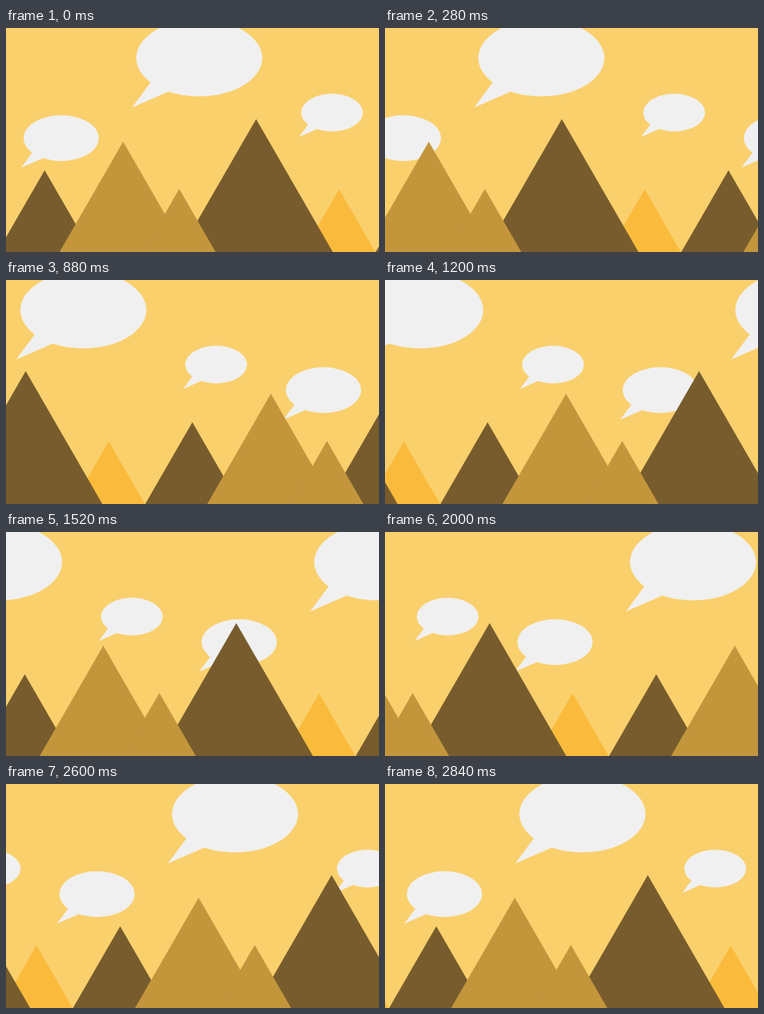
Write an HTML page with a canvas that moves like this. It is 500 by 300 pixels and loops after 2920 ms.

```html
<!DOCTYPE html>
<html lang="en">
<head>
<meta charset="utf-8">
<title>Mountains and speech clouds</title>
<style>
  html, body { margin: 0; width: 100%; height: 100%; overflow: hidden; background: #fad06c; }
  canvas { display: block; }
</style>
</head>
<body>
<canvas id="stage" width="500" height="300"></canvas>
<script>
const ctx = document.getElementById('stage').getContext('2d');
const W = 500, H = 300;
const LOOP = 2920, STEP = 40, LAST = 71;
const PERIOD = 506.9;
const HILL_SPEED = 14.04, CLOUD_SPEED = 7.06; // pixels per step
const SLOPE = Math.tan(Math.PI / 6);

const SKY = '#fad06c', CLOUD = '#f0f0f0';
const BROWN = '#785c2d', TAN = '#c4963c', YELLOW = '#fabb3d';

// Back to front: peak x, peak y, colour
const hills = [
  [446.5, 216, YELLOW],
  [51.8, 190.5, BROWN],
  [335.3, 122, BROWN],
  [157, 152.3, TAN],
  [232.2, 215.5, TAN]
];

// Centre x, centre y, horizontal radius
const clouds = [
  [259, 40.2, 84.5],
  [74, 147.5, 50.4],
  [437, 113.3, 41.5]
];

function polygon(points) {
  ctx.beginPath();
  for (const [x, y] of points) ctx.lineTo(x, y);
  ctx.fill();
}

function drawHill(x, y, color) {
  const half = (H - y) * SLOPE;
  ctx.fillStyle = color;
  polygon([[x, y], [x + half, H], [x - half, H]]);
}

function drawCloud(x, y, r) {
  ctx.fillStyle = CLOUD;
  ctx.beginPath();
  ctx.ellipse(x, y, r, r * 0.608, 0, 0, Math.PI * 2);
  ctx.fill();
  const at = (u, v) => [x + u * r, y + v * r];
  polygon([at(-1.066, 0.785), at(-0.74, 0.345), at(-0.4, 0.494)]);
}

// Draws every copy of an item that can reach the stage.
function scroll(items, shift, draw) {
  const offset = shift % PERIOD;
  for (const [x, ...rest] of items) {
    for (let k = -1; k <= 2; k++) draw(x - offset + k * PERIOD, ...rest);
  }
}

function render(ms) {
  const step = Math.min(LAST, Math.floor((ms % LOOP) / STEP));
  ctx.fillStyle = SKY;
  ctx.fillRect(0, 0, W, H);
  scroll(clouds, step * CLOUD_SPEED, drawCloud);
  scroll(hills, step * HILL_SPEED, drawHill);
}

const start = performance.now();
function tick() {
  render(performance.now() - start);
  requestAnimationFrame(tick);
}
tick();
</script>
</body>
</html>
```
